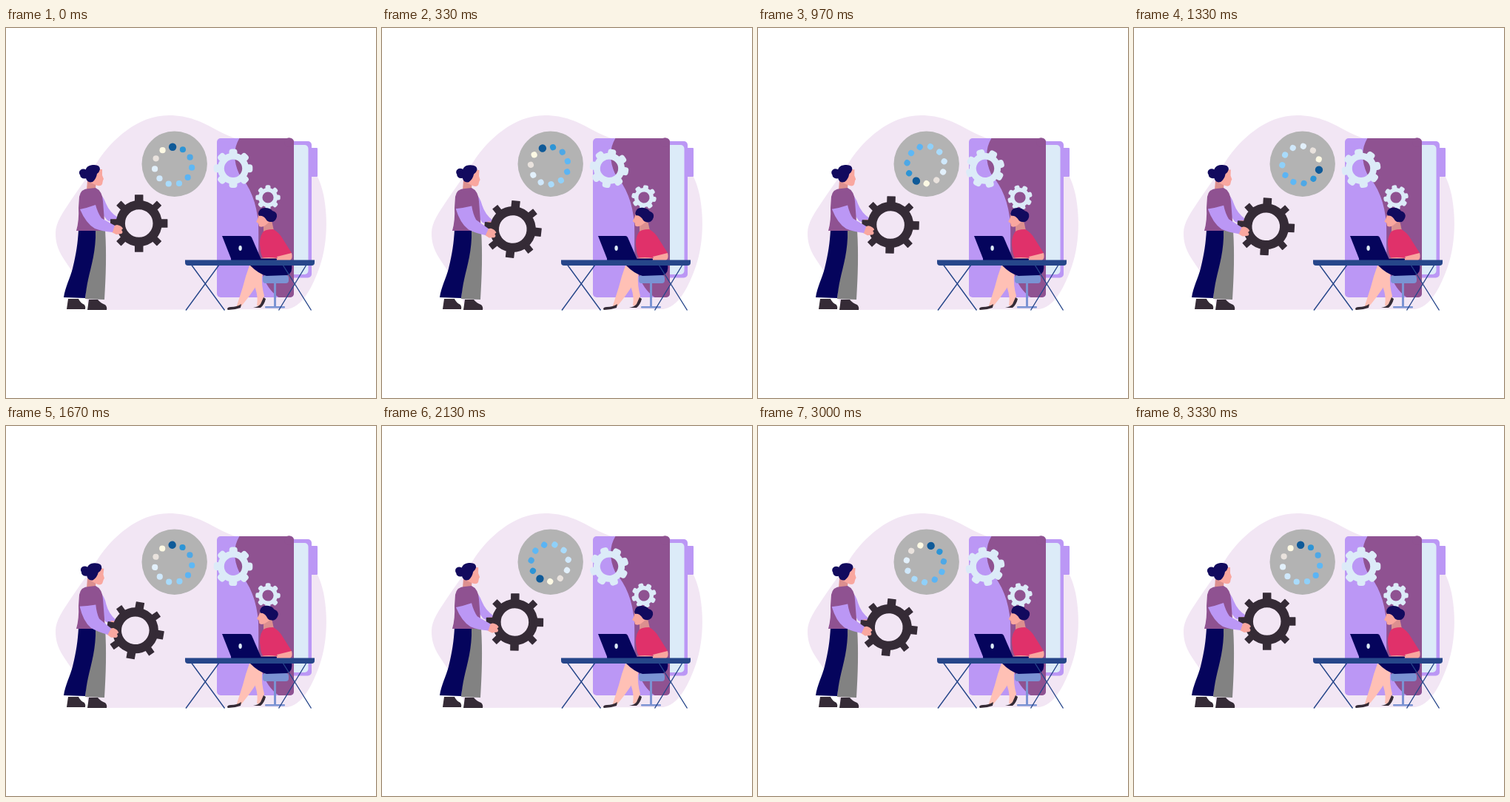
These frames come from a looping animation (500x500 px, 3360 ms). An HTML page with a canvas:

```html
<!DOCTYPE html>
<html lang="en">
<head>
<meta charset="utf-8">
<title>Teamwork with gears</title>
<style>
html, body { margin: 0; width: 100%; height: 100%; overflow: hidden; background: #fff; }
canvas { display: block; width: 500px; height: 500px; }
</style>
</head>
<body>
<canvas id="stage" width="500" height="500"></canvas>
<script>
const ctx = document.getElementById('stage').getContext('2d');
const LOOP = 3360, TRAVEL = 3333, TAU = Math.PI * 2, DEG = Math.PI / 180;
const C = {
  blob: '#f2e6f4', lilac: '#bb97f5', plum: '#8f5291', ice: '#dcebf8', navy: '#05045c',
  hair: '#120a5e', skin: '#f9a79f', neck: '#dc8f8f', leg: '#ffc0b5', dark: '#352b36',
  grey: '#828282', desk: '#26468a', stool: '#7b93d3', red: '#e0316a', disc: '#b3b3b3'
};
const DOTS = ['#0f5a98', '#2d95d6', '#4ea8e6', '#5eb8f5', '#5bb4f4', '#8fd0f9',
  '#a9dbfb', '#cfe8fb', '#e2f0fb', '#e9e2dd', '#fdf9e4'];

const smooth = p => p * p * (3 - 2 * p);
const wave = p => { // 0 -> 1 -> 0, eased at both ends
  const x = (p * 2) % 2;
  return smooth(x < 1 ? x : 2 - x);
};

function fill(color, d) {
  ctx.fillStyle = color;
  ctx.fill(new Path2D(d));
}
function circle(color, x, y, rx, ry = rx, tilt = 0) {
  ctx.fillStyle = color;
  ctx.beginPath();
  ctx.ellipse(x, y, rx, ry, tilt, 0, TAU);
  ctx.fill();
}
function box(color, x, y, w, h, r = 0) {
  ctx.fillStyle = color;
  ctx.beginPath();
  ctx.roundRect(x, y, w, h, r);
  ctx.fill();
}
function stroke(color, width, d) {
  ctx.strokeStyle = color;
  ctx.lineWidth = width;
  ctx.stroke(new Path2D(d));
}
function turned(x, y, degrees, draw) {
  ctx.save();
  ctx.translate(x, y);
  ctx.rotate(degrees * DEG);
  ctx.translate(-x, -y);
  draw();
  ctx.restore();
}

function gear(color, x, y, outer, body, hole, straight, diagonal, corner) {
  ctx.save();
  ctx.translate(x, y);
  // body ring, leaving the hole see-through
  ctx.strokeStyle = color;
  ctx.lineWidth = body - hole;
  ctx.beginPath();
  ctx.arc(0, 0, (body + hole) / 2, 0, TAU);
  ctx.stroke();
  for (let i = 0; i < 8; i++) {
    const width = i % 2 ? diagonal : straight;
    box(color, -width / 2, -outer, width, outer - body + 4, [corner, corner, 0, 0]);
    ctx.rotate(TAU / 8);
  }
  ctx.restore();
}

function backdrop() {
  fill(C.blob, `M112 381 C108 350 88 328 78 312 C69 298 67 288 67 277
    C67 262 78 248 87 234 C100 215 112 198 124 180 C143 151 178 118 220 118
    C247 118 265 127 285 138 C305 149 320 153 345 156
    C395 162 421 185 429 225 C436 260 434 300 420 333 C410 358 398 377 380 380 Z`);
}

function cards() {
  box(C.lilac, 370, 153, 43, 184.5, 5);
  box(C.lilac, 405, 162, 16, 39, 1);
  box(C.ice, 370, 158, 38.5, 175, 5);
  ctx.save();
  ctx.beginPath();
  ctx.roundRect(285, 149, 104, 215, 5);
  ctx.clip();
  box(C.lilac, 285, 149, 104, 215);
  fill(C.plum, `M316 148 C307 162 307 180 315 197 C330 215 339 236 341 265
    C342 290 339 312 346 332 C351 347 359 358 370 365 L390 365 L390 148 Z`);
  ctx.restore();
  circle(C.plum, 382.5, 154.5, 6.3);
}

function spinner(p) {
  circle(C.disc, 227.7, 183.7, 44.2);
  turned(226.2, 185.3, -720 * smooth(p), () => DOTS.forEach((color, i) => {
    const a = (i * 360 / DOTS.length - 2) * DEG;
    circle(color, 226 + 25.3 * Math.sin(a), 186 - 25.3 * Math.cos(a), i ? 4.1 : 5.2);
  }));
}

function whiteGears(p) {
  const angle = 360 * smooth(p);
  turned(307, 189.8, angle, () => gear(C.ice, 307, 189.8, 26.3, 21, 12.2, 11, 11, 4));
  turned(354, 229, angle, () => gear(C.ice, 354, 229, 16.7, 13, 7.6, 7, 7, 2.5));
}

function standingWoman(sway) {
  fill(C.grey, 'M114 274 L134 273 C136 305 135 335 133 367 L107 366 C109 335 117 305 114 274 Z');
  fill(C.navy, `M98 273 L121 273 C122 300 115 322 111 340 C109 349 108 357 107 365
    L78 364 C80 350 87 337 90 325 C95 305 97 290 98 273 Z`);
  fill(C.dark, 'M82 380 L84 366 L98 366 Q100 371 106 374 Q108 377 107 380 Z');
  fill(C.dark, 'M110 381 L112 367 L124 367 Q128 372 134 374 Q137 377 136 381 Z');

  turned(107, 242, 8 * sway, () => {
    fill(C.lilac, 'M124 222 Q131 226 135 237 Q140 249 151 256 L147 264 L137 260 L126 246 Z');
    fill(C.skin, 'M144 258 L152 258 L156 265 L148 268 Z');
  });
  fill(C.neck, 'M110 206 L109 219 Q116 222 121 217 L122 206 Z');
  turned(115, 214, 6 * sway, () => {
    fill(C.skin, `M112 196 L114 209 L121 212 Q128 215 130 211
      L131 206 L132 204 L130 199 L130 191 L118 191 Z`);
    circle(C.hair, 104.5, 195.5, 5.6, 5);
    circle(C.hair, 106, 199, 5.8, 4.6);
    fill(C.hair, `M107 198 Q106 186 117 185 Q127 184 127 191 Q126 195 123 197
      Q122 204 117 208 Q110 210 108 203 Z`);
  });
  fill(C.plum, `M99 228 Q101 217 112 217 L121 216 Q130 220 131 234 L134 274
    L95 274 Q99 260 98 243 Z`);

  turned(107, 242, 10 * sway, () => {
    gear(C.dark, 179.7, 264, 38.7, 31, 18.8, 11.5, 9, 0.5);
    fill(C.skin, 'M143 268 L150 266 Q156 267 158 271 L156 273 Q159 276 156 278 L149 279 L143 276 Z');
    fill(C.lilac, `M100 245 Q110 243 121 239 Q124 250 129 257 Q138 262 147 267
      L144 276 Q130 275 120 271 Q108 264 100 245 Z`);
  });
}

function seatedWoman(sway) {
  box(C.stool, 362, 343, 3, 35);
  box(C.stool, 350, 376, 27, 2.5, 1);
  box(C.stool, 347, 334, 35, 11, 4);
  fill(C.leg, 'M334 330 L346 332 Q345 348 349 362 L344 376 L339 375 Q341 364 337 352 Z');
  fill(C.leg, `M329 321 L350 324 Q346 338 338 349 Q328 364 318 376 L311 378
    Q315 366 320 350 Q324 334 329 321 Z`);
  fill(C.dark, 'M299 380 Q299 377 304 377 Q312 377 318 373 L317 378 Q309 381 300 381 Z');
  fill(C.dark, 'M334 378 Q341 377 344 373 L348 364 L351 366 Q349 374 344 378 Z');
  fill(C.navy, 'M330 319 L386 319 Q388 331 380 334 L352 335 Q341 332 330 321 Z');

  fill(C.neck, 'M348 261 L359 260 L362 274 Q355 278 348 275 Z');
  turned(354, 270, 6 * sway, () => {
    fill(C.skin, `M342 251 L340 258 L338 262 L341 264 L342 268 Q346 270 350 267
      L356 262 L357 254 L350 249 Z`);
    fill(C.hair, `M341 251 Q342 243 350 243 Q357 243 360 247 Q367 249 366 255
      Q364 263 357 262 Q353 262 351 258 Q347 253 342 254 Z`);
  });
  fill(C.red, `M344 300 Q341 285 347 276 Q350 272 361 272 Q369 276 374 285
    L386 304 Q376 309 366 310 L365 313 L349 313 Q344 307 344 300 Z`);
  fill(C.skin, 'M366 309 L386 304 Q388 311 384 314 L345 314 L344 311 Q355 309 367 311 Z');
}

function deskAndLaptop() {
  fill(C.navy, 'M292 281 L329 281 Q331 281 332 283 L345 313 L305 314 Z');
  box(C.navy, 304, 311.5, 62, 2.5, 1);
  circle(C.ice, 316.6, 297.5, 2.2, 3.4);
  box(C.desk, 242, 313.5, 175, 7.5, [0, 0, 4, 4]);
  stroke(C.desk, 1.4, `M250.5 320 L295.5 381.5 M288 320 L243 381.5
    M374 320 L412.5 381.5 M406 320 L368.5 381.5`);
}

function render(now) {
  const p = Math.min(1, (now % LOOP) / TRAVEL);
  const sway = wave(p * 3);
  ctx.fillStyle = '#fff';
  ctx.fillRect(0, 0, 500, 500);
  backdrop();
  cards();
  spinner(p);
  whiteGears(p);
  standingWoman(sway);
  seatedWoman(sway);
  deskAndLaptop();
}

let start = null;
function tick(now) {
  if (start === null) start = now;
  render(now - start);
  requestAnimationFrame(tick);
}
requestAnimationFrame(tick);
</script>
</body>
</html>
```
